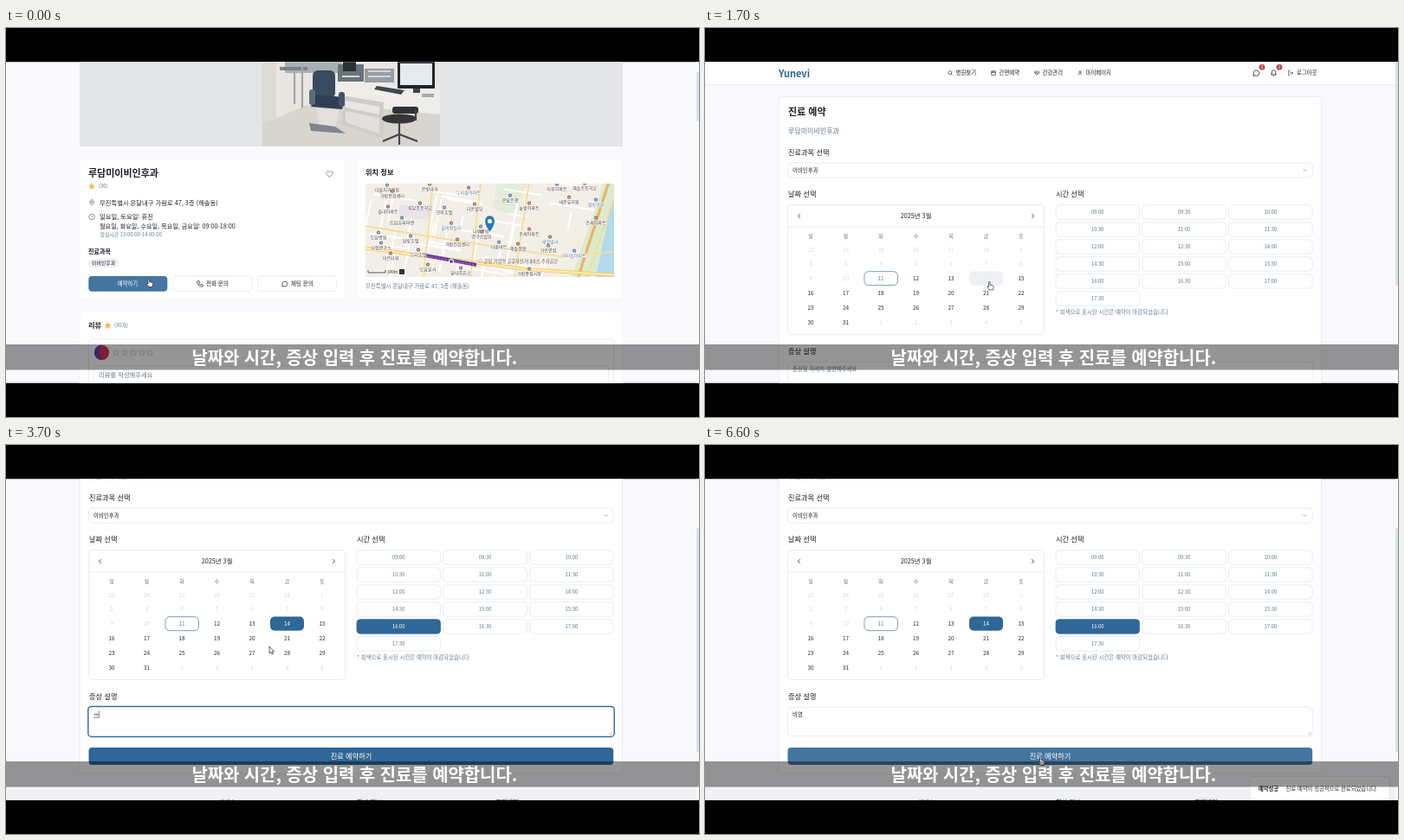
Animation, 800 px wide and 450 px high, one loop 6700 ms. Source, as an HTML page:

```html
<!DOCTYPE html>
<html lang="ko">
<head>
<meta charset="utf-8">
<style>
html, body { margin: 0; width: 100%; height: 100%; overflow: hidden; background: #000; }
svg { display: block; width: 800px; height: 450px; font-family: "Noto Sans CJK KR", "Noto Sans CJK", sans-serif; }
</style>
</head>
<body>
<svg id="stage" viewBox="0 0 800 450" lang="ko"></svg>
<script>
const LOOP = 6700, STEP = 100;
const BRAND = "Yunevi", CLINIC = "루담미이비인후과";
const ADDRESS = "무진특별시 온달내구 가람로 47, 3층 (해솔동)";
const INK = "#1c1f26", GRAY = "#667788", LINE = "#e4e8f0", BLUE = "#2f6797", HOVER = "#45769f";
const S = 6.4, M = 7.3, L = 8.2, XL = 11;

// y is the vertical middle of the glyphs
const text = (x, y, size, str, fill = INK, weight = 400, anchor = "start", extra = "") =>
  `<text x="${x}" y="${(y + size * .37).toFixed(2)}" font-size="${size}" fill="${fill}" font-weight="${weight}" text-anchor="${anchor}" ${extra}>${str}</text>`;
const mid = (x, y, size, str, fill, weight) => text(x, y, size, str, fill, weight, "middle");
const box = (x, y, w, h, fill = "#fff", stroke = "none", r = 0, extra = "") =>
  `<rect x="${x}" y="${y}" width="${w}" height="${h}" rx="${r}" fill="${fill}" stroke="${stroke}" stroke-width=".8" ${extra}/>`;
const dot = (x, y, r, fill) => `<circle cx="${x}" cy="${y}" r="${r}" fill="${fill}"/>`;
const line = (d, stroke, w = 1, extra = "") =>
  `<path d="${d}" fill="none" stroke="${stroke}" stroke-width="${w}" ${extra}/>`;
const poly = (points, fill) => `<polygon points="${points}" fill="${fill}"/>`;
const group = (id, body, extra = "") => `<g id="${id}" ${extra}>${body}</g>`;

const ICONS = {
  search: "M18 11a7 7 0 1 1-14 0a7 7 0 0 1 14 0M16 16l5 5",
  calendar: "M4 5h16v16H4zM4 10h16M8 2v5M16 2v5",
  heart: "M12 21L4 13C-1 7 7 0 12 7C17 0 25 7 20 13Z",
  pulse: "M12 21L4 13C-1 7 7 0 12 7C17 0 25 7 20 13ZM3 12h6l2-3 3 6 2-3h5",
  user: "M16 8a4 4 0 1 1-8 0a4 4 0 0 1 8 0M5 21c0-9 14-9 14 0",
  chat: "M4 21l1-5a9 8.5 0 1 1 4 4Z",
  bell: "M4 17c3-3 2-7 3-10c2-6 8-6 10 0c1 3 0 7 3 10ZM10 21h4",
  exit: "M10 3H4v18h6M9 12h12M16 7l5 5-5 5",
  pin: "M12 22C2 12 4 2 12 2S22 12 12 22ZM15 10a3 3 0 1 1-6 0a3 3 0 0 1 6 0",
  clock: "M22 12a10 10 0 1 1-20 0a10 10 0 0 1 20 0M12 6v6l4 2",
  phone: "M5 2h4l2 6-3 2c1 3 3 5 6 6l2-3 6 2v4c0 3-3 3-5 3C9 21 2 13 2 6c0-2 1-4 3-4Z",
  star: "M12 2l3 7 7 .6-5.4 4.8L18.4 22 12 18l-6.4 4 1.8-7.6L2 9.6 9 9Z",
  left: "M15 6l-6 6 6 6", right: "M9 6l6 6-6 6", down: "M6 9l6 6 6-6"
};
const icon = (name, x, y, size = 7.5, stroke = INK, fill = "none") =>
  `<path d="${ICONS[name]}" transform="translate(${x - size / 2} ${y - size / 2}) scale(${size / 24})" fill="${fill}" stroke="${stroke}" stroke-width="2.2" stroke-linejoin="round"/>`;

function header() {
  const nav = [["search", 283, "병원찾기"], ["calendar", 333, "간편예약"], ["pulse", 383, "건강관리"], ["user", 433, "마이페이지"]];
  return box(-5, 39, 810, 26.5) + line("M-5 65.7H805", LINE, .8) +
    text(85, 53, XL, BRAND, "#2f6488", 700) +
    nav.map(([name, x, label]) => icon(name, x, 52, 6.8) + text(x + 6.6, 52, S, label, INK, 500)).join("") +
    icon("chat", 636, 52, 9) + icon("bell", 656.5, 52, 9) +
    [[643, "2"], [663, "1"]].map(([x, n]) => dot(x, 45.3, 3.4, "#bb4c4c") + mid(x, 45.3, 4.6, n, "#fff")).join("") +
    icon("exit", 676, 52, 7) + text(683, 52, S, "로그아웃", INK, 500);
}

// laid out with its top edge at y = 0
function footer() {
  const cols = [
    [245, "서비스", ["병원 찾기", "간편 예약", "건강 관리"], 13.4],
    [405, "회사 정보", ["회사 소개", "이용약관", "개인정보처리방침"], 13.4],
    [565, "고객센터", ["평일 09:00 - 18:00", "주말 및 공휴일 휴무"], 11.3]
  ];
  return box(-5, 0, 810, 116, "#f0f1f5") +
    text(85, 20.5, L, BRAND, INK, 700) +
    text(85, 36.3, S, "더 쉽고 편리한 스마트 의료 서비스를 제공합니다.", "#59636f") +
    cols.map(([x, head, items, gap]) => text(x, 19, M, head, INK, 700) +
      items.map((s, i) => text(x, 35.6 + i * gap, S, s, "#59636f")).join("")).join("") +
    line("M85 81H711", "#e1e4ea", .8) +
    mid(398, 99, 6, `© 2025 ${BRAND}. All rights reserved.`, "#59636f");
}

function photo() {
  return box(85, 39, 627, 98, "#e3e5e9") +
    `<g clip-path="url(#photo)">` +
    box(295, 39, 206, 98, "#e9e6e1") + poly("295,112 345,90 501,92 501,137 295,137", "#d8d4ce") +
    poly("295,39 312,39 312,104 295,112", "#dedbd6") + box(322, 39, 66, 13, "#a9b0b4") +
    box(316, 45, 32, 4, "#7d8387") + line("M333 49V88M342 44V92", "#a3a7a9", 2.2) +
    poly("382,58 501,72 501,100 382,88", "#efedea") + poly("388,78 436,86 436,128 388,112", "#cfcdc9") +
    poly("392,84 431,91 431,100 392,92", "#e9e7e4") + poly("392,96 431,104 431,122 392,109", "#e2e0dc") +
    box(383, 42, 30, 20, "#68737b") + box(389, 39, 15, 11, "#2a2f34") + box(414, 47, 34, 16, "#979ea3") +
    line("M418 50H444M388 56H408M418 56H444", "#d3d6d8", 2) +
    box(452, 39, 43, 31, "#22262b", "none", 1) + box(455, 41, 37, 25, "#e4ebf1") + box(470, 70, 8, 5, "#444") +
    poly("428,67 460,72 456,77 425,71", "#43484d") + box(480, 76, 14, 4, "#aaa") +
    box(354, 49, 26, 32, "#394b60", "none", 6) + poly("357,77 390,80 388,94 352,91", "#2d3f54") +
    box(350, 71, 7, 18, "#5d6a78", "none", 3) + box(384, 74, 7, 17, "#42536a", "none", 3) +
    poly("358,93 384,95 380,117 362,114", "#e3e1de") + poly("350,110 380,114 392,122 352,119", "#80868c") +
    box(446, 91, 30, 8, "#2f3135", "none", 3) + `<ellipse cx="454" cy="105" rx="20" ry="5.5" fill="#34363a"/>` +
    line("M473 94V107M454 108V124M435 131L454 123L475 131M454 123V135", "#45474b", 2.2) + `</g>`;
}

function map() {
  let seed = 5;
  const rnd = () => (seed = seed * 16807 % 2147483647) / 2147483647;
  let streets = "";
  for (let i = 0; i < 44; i++) {
    const x = 405 + rnd() * 270, y = 178 + rnd() * 104, len = 20 + rnd() * 55;
    streets += i % 2 ? `M${x} ${y}l${len} ${len * .16}` : `M${x} ${y}l${-len * .16} ${len * .8}`;
  }
  const labels = [
    [440, 187, "다솔치과의원"], [489, 186, "온빛내과"], [534, 190, "누리솔아파트"], [636, 186, "미루아파트"], [668, 185, "해솔초등학교"],
    [446, 194, "가람문화센터"], [582, 199, "온달은행"], [604, 208, "늘빛아파트"], [650, 201, "새온유치원"], [681, 204, "물빛공원"],
    [441, 212, "솔내아파트"], [478, 208, "루담초등학교"], [506, 213, "모아호텔"], [541, 209, "다온빌딩"], [681, 225, "은새아파트"],
    [457, 225, "도담슈퍼마켓"], [514, 231, "솔바람빌라"], [604, 238, "온새아파트"], [548, 235, "나루병원"], [549, 241, "연구소빌딩"],
    [430, 242, "도담병원"], [467, 246, "달빛호텔"], [521, 250, "가람건강센터"], [628, 247, "새길빌라"], [569, 253, "다솜마트"],
    [591, 255, "해솔생활"], [626, 257, "가온연립"], [433, 254, "시험연구소"], [444, 266, "미르타워"], [476, 262, "누리호텔"],
    [656, 263, "아라빌아파트"], [487, 279, "도담본사"], [525, 283, "달내주유소"], [604, 284, "가람종합시장"]
  ];
  return `<g clip-path="url(#map)">` + box(415, 180, 287, 108, "#f3efe7") +
    poly("566,180 602,180 588,218 562,208", "#e5ecda") + poly("454,205 492,204 490,222 454,219", "#e9e1ec") +
    line(streets, "#fff", 2) +
    poly("690,180 702,180 702,270 674,288 653,288", "#dcebd0") + poly("699,201 702,199 702,288 681,288", "#b5d9ec") +
    line("M696 178L660 290", "#eeb367", 3.2) + line("M704 190L670 290", "#f5dc98", 2) +
    line("M408 228L520 246L645 265L710 258M493 178L482 290M604 178L587 290M548 178L536 290", "#f4df9b", 2) +
    line("M412 254L500 266L600 279L706 286", "#eec45f", 4) + line("M412 254L500 266L600 279L706 286", "#ffe9ac", 2.6) +
    line("M484 263L543 274", "#6e389f", 4) + line("M487 264L541 274", "#b89ace", .7, `stroke-dasharray="2 2"`) +
    dot(514, 270, 3, "#fff") + dot(514, 270, 2, "#7047a4") +
    labels.map(([x, y, s], i) => dot(x, y - 5.3, 2.1, i % 3 ? "#946b5a" : "#637f9c") + dot(x, y - 5.3, .7, "#fff") +
      text(x, y, 5.1, s, i % 7 === 2 ? "#5d7da0" : "#46433f", 500, "middle", `stroke="#fff" stroke-width=".8" paint-order="stroke"`)).join("") +
    text(545, 270, 5.2, "◇ 온달 가람역 공공자전거대여소 주차공간", "#73675f") +
    line("M418 280v3h20v-3", "#333", .8) + text(440, 282, 4.7, "100m", "#333") + box(454, 279, 6, 6, "#333") +
    `<path d="M558.5 236C550 226 552 217 558.5 217S567 226 558.5 236Z" fill="#2b78b5" stroke="#fff" stroke-width=".7"/>` +
    dot(558.5, 223.5, 2.5, "#fff") + `</g>`;
}

function clinicPage() {
  const stars = [126.5, 137, 147, 156.8, 166.5];
  return box(0, 39, 800, 372, "#fafafd") + photo() +
    box(85, 151, 306.5, 163, "#fff", "#f0f1f5", 4) + box(405, 151, 306.5, 163, "#fff", "#f0f1f5", 4) +
    box(85, 328, 626.5, 100, "#fff", "#f0f1f5", 4) +
    text(95, 167.5, XL, CLINIC, INK, 700) + icon("heart", 373.5, 169, 9.5, "#77808c") +
    icon("star", 99, 183, 7.5, "#f3b84c", "#f3b84c") + text(107, 183, 5.9, "(30)", GRAY) +
    icon("pin", 99, 202, 8, "#687483") + text(108, 202.3, M, ADDRESS) +
    icon("clock", 99, 218.5, 8, "#687483") + text(108, 218.5, M, "일요일, 토요일: 휴진") +
    text(108, 229, 7.15, "월요일, 화요일, 수요일, 목요일, 금요일: 09:00-18:00") +
    text(108.5, 239, 5.9, "점심시간 13:00:00-14:00:00", GRAY) +
    text(95, 258, 7.1, "진료과목", INK, 700) +
    box(95, 266.5, 35, 11, "#f0f1f5", "none", 5) + text(99, 272, 5.9, "이비인후과", INK, 500) +
    box(95.3, 286.9, 91, 17.8, HOVER, "none", 4) + mid(140.5, 296, S, "예약하기", "#fff", 500) +
    box(192.7, 286.9, 91, 17.8, "#fff", LINE, 4) + icon("phone", 224, 296, 8) + text(231, 296, 6.5, "전화 문의", INK, 500) +
    box(290.4, 286.9, 91, 17.8, "#fff", LINE, 4) + icon("chat", 321.5, 296, 8) + text(329, 296, 6.5, "채팅 문의", INK, 500) +
    text(415, 167, L, "위치 정보", INK, 700) + map() + text(415, 298.5, S, ADDRESS, GRAY) +
    text(95, 344, L, "리뷰", INK, 700) + icon("star", 117.5, 344, 8, "#f3b84c", "#f3b84c") + text(125, 344, 5.9, "(30개)", GRAY) +
    box(95.5, 360, 606, 70, "#fff", LINE, 4) + dot(110.5, 375.3, 8.6, "#d0365a") +
    `<path d="M110.5 366.7a8.6 8.6 0 0 0 0 17.2q-5-8.6 0-17.2Z" fill="#6a3fb4"/>` +
    stars.map(x => icon("star", x, 375.3, 8.5, "#c5cad2")).join("") +
    box(101.5, 391, 594, 40, "#fff", LINE, 3) + text(107, 401, M, "리뷰를 작성해주세요", GRAY) +
    box(797, 39, 3, 372, "#f8f9fc") + box(797, 51, 3, 57, "#d6e0ec");
}

function calendar() {
  const colX = i => 122 + 40.5 * i, rowY = i => 256.3 + 16.8 * i;
  let out = box(95.5, 204.5, 296, 150, "#fff", LINE, 4) + line("M95.5 230H391.5", LINE, .8) +
    mid(243.5, 217.5, M, "2025년 3월", INK, 500) + icon("left", 108.5, 217.5, 9) + icon("right", 378.5, 217.5, 9) +
    [..."일월화수목금토"].map((d, i) => mid(colX(i), 241, 5.9, d, "#64717f")).join("") +
    box(183.9, 281.7, 38.5, 16, "#fff", "#5c7f9f", 5) + box(305, 281.6, 39, 16.2, "none", "none", 5, `id="pick"`);
  for (let i = 0; i < 42; i++) {
    const n = i - 5, day = n < 1 ? n + 28 : n > 31 ? n - 31 : n, open = n > 11 && n <= 31;
    const fill = n === 11 ? "#5d7f9a" : open ? "#20242b" : "#d2d8e0";
    out += text(colX(i % 7), rowY(i / 7 | 0), S, day, fill, open ? 500 : 400, "middle", n === 14 ? `id="pickText"` : "");
  }
  return out;
}

// half-hour slots from 09:00, with a break from 13:00 to 14:00
function timeSlots() {
  let out = "";
  for (let i = 0; i < 16; i++) {
    const mins = 540 + i * 30 + (i > 7 ? 60 : 0);
    const label = String(mins / 60 | 0).padStart(2, "0") + ":" + (mins % 60 ? "30" : "00");
    const x = 405 + 99.8 * (i % 3), y = 213 + 20 * (i / 3 | 0), chosen = label === "16:00";
    out += box(x, y - 8.2, 96.5, 16.4, "#fff", LINE, 4, chosen ? `id="slot"` : "") +
      text(x + 48.3, y, 5.9, label, "#5c7788", 400, "middle", chosen ? `id="slotText"` : "");
  }
  return out;
}

function bookingPage() {
  return header() + box(85, 79.5, 626.5, 383.5, "#fff", LINE, 4) +
    text(96, 96.5, XL, "진료 예약", INK, 700) + text(96, 119, 8, CLINIC, GRAY) +
    text(96, 143.7, L, "진료과목 선택", INK, 500) + box(95.5, 156, 605.7, 17, "#fff", LINE, 4) +
    text(101, 164.5, S, "이비인후과", INK, 500) + icon("down", 692.5, 164.5, 7, "#6f7985") +
    text(96, 191.8, L, "날짜 선택", INK, 500) + text(405, 191.8, L, "시간 선택", INK, 500) +
    calendar() + timeSlots() +
    text(405, 328.7, S, "* 회색으로 표시된 시간은 예약이 마감되었습니다", "#667b89") +
    text(96, 374, L, "증상 설명", INK, 500) + box(95.5, 386.2, 605.7, 33.4, "#fff", LINE, 4, `id="area"`) +
    text(101, 394.5, S, "", INK, 400, "start", `id="symptom"`) +
    line("M0 0", INK, .6, `id="caret"`) + line("M696.5 418L699.5 415M698.3 418.2L699.5 417", "#777", .5) +
    box(95.5, 433, 605.7, 20, BLUE, "none", 4, `id="submit"`) + mid(398.5, 443, L, "진료 예약하기", "#fff", 500) +
    group("foot", footer(), `transform="translate(0 477)"`);
}

const CURSORS = {
  arrow: `<path d="M0 0V8L1.9 6.4 3.1 9 4.3 8.5 3.2 6H5.6Z" fill="#fff" stroke="#222" stroke-width=".7"/>`,
  hand: `<path d="M0 .8C0-.4 1.6-.4 1.6 .8V3.7L5 4.5C6 5 5.5 7.5 4.7 9.5H.8L-1.8 6C-2 5-.8 5 0 6Z" fill="#fff" stroke="#222" stroke-width=".7"/>`,
  beam: `<path d="M-1.5-3.5H1.5M0-3.5V3.5M-1.5 3.5H1.5" fill="none" stroke="#333" stroke-width=".8"/>`
};

const stage = document.getElementById("stage");
stage.innerHTML = `<defs><clipPath id="view">${box(0, 39.3, 800, 371.4)}</clipPath>
  <clipPath id="photo">${box(295.5, 39, 205.5, 98)}</clipPath><clipPath id="map">${box(415, 180, 287, 108)}</clipPath></defs>` +
  box(0, 0, 800, 450, "#000") + `<g clip-path="url(#view)">` +
  group("clinic", clinicPage()) +
  group("loading", box(0, 39, 800, 372, "#fefeff") + `<g transform="translate(2 0)">${header()}</g>` +
    mid(400, 70.5, 7.1, "로딩 중입니다...") + `<g transform="translate(2 75.5)">${footer()}</g>`) +
  group("booking", box(0, 39, 800, 372, "#f9f9fd") + group("page", bookingPage()) +
    box(797, 39, 3, 372, "#f8f9fc") + box(797, 39, 3, 259, "#d6e0ec", "none", 0, `id="thumb"`)) +
  group("toast", box(628, 383, 163, 46, "#e9ebef", "none", 4) + box(629, 383.5, 161, 45, "#fff", LINE, 3) +
    text(639, 397.5, 6.3, "예약성공", INK, 700) + text(670.5, 397.5, 6.33, "진료 예약이 성공적으로 완료되었습니다.", "#30353c")) +
  Object.keys(CURSORS).map(k => group(k, CURSORS[k])).join("") + `</g>` +
  box(0, 366, 800, 29.5, "#000", "none", 0, `opacity=".415"`) +
  mid(402.3, 382, 19.9, "날짜와 시간, 증상 입력 후 진료를 예약합니다.", "#fff", 700);

const el = id => document.getElementById(id);
const set = (id, attrs) => { for (const k in attrs) el(id).setAttribute(k, attrs[k]); };
const show = (id, on) => set(id, { display: on ? "inline" : "none" });

const POINTER = [
  [0, 164, 290, "hand"], [100, 161.5, 289, "arrow"], [900, 161.5, 289, "arrow"], [1500, 327.5, 293.5, "hand"],
  [1900, 327.5, 293.5, "hand"], [2200, 452, 291, "hand"], [2400, 452, 291, "arrow"], [2700, 400, 332, "beam"],
  [3200, 400, 332, "arrow"], [3500, 304, 233, "arrow"], [4500, 304, 233, "arrow"], [5000, 386.5, 361, "hand"]
];
const SCROLL = [[0, 0], [2300, 0], [2600, 69], [3000, 69], [3200, 83]];
const TYPING = [[0, ""], [3500, "ㅆ"], [3900, ""], [4000, "ㅂ"], [4100, "비"], [4300, "빙"], [4400, "비여"], [4500, "비염"]];
const TOAST = [[0, 30], [5400, 30], [5700, 0]];

const keyAt = (table, t) => table.reduce((found, row, i) => row[0] <= t ? i : found, 0);
function tween(table, t, col = 1) {
  const i = keyAt(table, t), a = table[i], b = table[i + 1];
  if (!b) return a[col];
  const p = (t - a[0]) / (b[0] - a[0]);
  return a[col] + (b[col] - a[col]) * p * p * (3 - 2 * p);
}

function render(t) {
  show("clinic", t < 100);
  show("loading", t >= 100 && t < 500);
  show("booking", t >= 500);

  const scroll = tween(SCROLL, t);
  set("page", { transform: `translate(0 ${-scroll})` });
  set("thumb", { y: 39 + scroll * .69 });

  const picked = t >= 1900, hovered = t >= 1500 && !picked, slot = t >= 2300;
  set("pick", { fill: picked ? BLUE : hovered ? "#eef0f4" : "none" });
  set("pickText", { fill: picked ? "#fff" : hovered ? "#e7eaef" : "#20242b" });
  set("slot", { fill: slot ? BLUE : "#fff", stroke: slot ? BLUE : LINE });
  set("slotText", { fill: slot ? "#fff" : "#5c7788" });

  const typed = TYPING[keyAt(TYPING, t)][1], focus = t >= 3100 && t < 5100;
  el("symptom").textContent = typed || "증상을 자세히 설명해주세요";
  set("symptom", { fill: typed ? INK : GRAY });
  set("area", focus
    ? { x: 94.8, y: 385.4, width: 607.4, height: 35, stroke: "#3d6c98", "stroke-width": 1.5 }
    : { x: 95.5, y: 386.2, width: 605.7, height: 33.4, stroke: LINE, "stroke-width": .8 });
  const end = 101 + typed.length * S * .92;
  set("caret", { d: `M${end + .4} 390.5V398.5` + (typed && t < 4600 ? `M${end - 5.8} 398.2H${end}` : "") });
  show("caret", focus);
  set("submit", { fill: t >= 5000 ? HOVER : BLUE });

  show("toast", t > 5400);
  set("toast", { transform: `translate(0 ${tween(TOAST, t)})` });

  const kind = POINTER[keyAt(POINTER, t)][3];
  for (const k in CURSORS) show(k, k === kind);
  set(kind, { transform: `translate(${tween(POINTER, t, 1)} ${tween(POINTER, t, 2)})` });
}

const start = performance.now();
function tick() {
  const t = (performance.now() - start) % LOOP;
  render(Math.floor(t / STEP) * STEP);
  requestAnimationFrame(tick);
}
tick();
</script>
</body>
</html>
```
